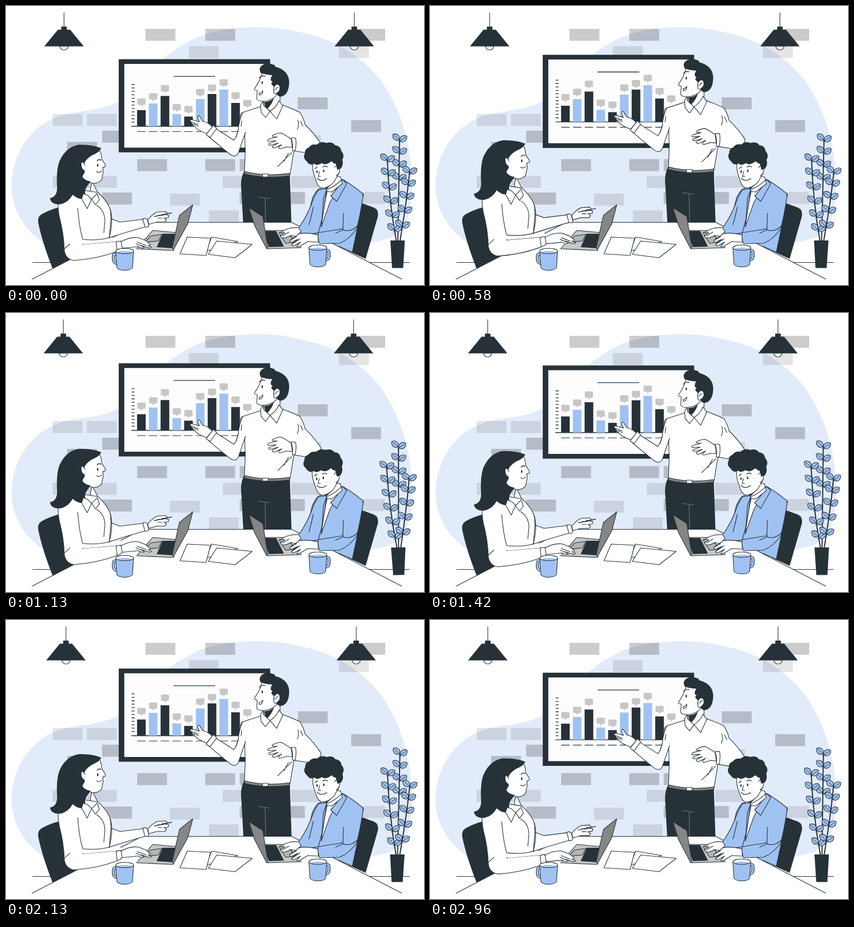
Write an HTML page that moves like this. It is 752x501 px and loops after 3 s.

```html
<!DOCTYPE html>
<html lang="en">
<head>
<meta charset="utf-8">
<title>Team meeting</title>
<style>
html, body { margin: 0; width: 100%; height: 100%; overflow: hidden; background: #fff; }
svg { display: block; width: 752px; height: 501px; }
</style>
</head>
<body>
<svg id="stage" viewBox="0 0 752 501" stroke-linecap="round" stroke-linejoin="round"></svg>
<script>
const DARK = '#263238', BLUE = '#a0c2f3', GRAY = '#c7c7c7', MID = '#868686', WHITE = '#fff';

const shape = (d, fill = WHITE) => `<path d="${d}" fill="${fill}" stroke="${DARK}" stroke-width="1.1"/>`;
const solid = (d, fill = DARK) => `<path d="${d}" fill="${fill}"/>`;
const line = (d, color = DARK, width = 1.1) => `<path d="${d}" fill="none" stroke="${color}" stroke-width="${width}"/>`;
const rect = (x, y, w, h, fill, extra = '') => `<rect x="${x}" y="${y}" width="${w}" height="${h}" fill="${fill}" ${extra}/>`;
const oval = (x, y, rx, ry, fill = DARK, extra = '') => `<ellipse cx="${x}" cy="${y}" rx="${rx}" ry="${ry}" fill="${fill}" ${extra}/>`;
const group = (name, ...parts) => `<g class="${name}">${parts.join('')}</g>`;

function wall() {
  const dark = [[251, 41], [358.5, 41], [628.5, 41], [525, 164], [621, 205], [236, 275], [358.5, 275],
    [420.5, 275], [173, 224], [110, 244], [173, 335], [420.5, 334], [484, 334]];
  const light = [[329, 72], [599, 72], [84, 194], [145.5, 194], [84, 305], [145.5, 305], [295, 337],
    [365, 367], [390, 305], [513, 305], [513, 232], [628, 334]];
  const bricks = (list, alpha) => list.map(([x, y]) => rect(x, y, 53.7, 21.5, '#000', `opacity="${alpha}"`)).join('');
  return solid('M10 322C10 270 42 210 108 194C160 184 196 186 226 152C262 110 296 78 345 56C390 37 470 32 525 46.5C588 57 638 89 672 131C711 184 729 250 730 310C731 370 722 404 690 417C640 432 560 440 400 440C250 440 150 450 98 440C52 424 10 380 10 322Z', '#e2ebf9')
    + bricks(dark, .2) + bricks(light, .1) + line('M48 460.5H104M655 460.5H726');
}

function lamp(x) {
  return `<g transform="translate(${x} 0)">` + shape('M-7.5 72A7.5 7 0 0 0 7.5 72Z') + line('M0 12V38')
    + solid('M-5 37H5V42.5H11L35.5 72.5H-35.5L-11 42.5H-5Z') + '</g>';
}

function board() {
  const tops = [187, 175, 161.5, 194, 198.5, 167, 158, 150, 174];
  const bubbles = [166, 156.5, 142, 176, 179.5, 149, 141, 131.5, 155, 168.5];
  const barX = i => 235.8 + i * 21.17;
  let out = rect(202.8, 95.5, 272.4, 167.3, DARK) + rect(212.8, 104, 253, 150.3, '#fdfdfe')
    + line('M302 126.4H376', DARK, 1.3) + line('M226 216H424', DARK, 1.4);
  for (let i = 0; i < 12; i++) out += line(`M226.5 ${141 + i * 6.15}h4.5`, DARK, 1.3);
  tops.forEach((y, i) => {
    out += rect(barX(i), y, 15.6, 216 - y, i % 2 ? BLUE : DARK) + line(`M${barX(i) + .5} 225.5h14.5`);
  });
  bubbles.forEach((y, i) => {
    const x = barX(i) + .4;
    out += rect(x, y, 14.8, 11.4, GRAY, 'rx="2"') + solid(`M${x + 5} ${y + 11}h5l-2.5 3.6z`, GRAY);
  });
  return out;
}

function presenter() {
  return solid('M428 298Q421 311 423.5 332L427.5 405H514L510.5 301Z')
    + line('M454 343L474 346M466 346Q467 365 467 402', '#7d868b', .9)
    // torso and far arm
    + shape('M492 176Q515 184 529 191Q536 203 538 213Q555 229 567 248L560 267L518 260L511 302Q470 309 429 298L430.5 258Q429 238 430 222L422 200Q421 193 426 191L460 180Z')
    + line('M525 205Q528 214 524 222M530 207L534 216M514 263L489 288M508 264L500 279')
    + shape('M513 237L521 237Q523 249 520 260L515 260Q517 248 513 237Z')
    // hand on chest
    + shape('M513 239Q502 231 495 228Q487 228 479 233L480 235L488 235L473 239Q469 241 472 243L486 242L473 247Q472 250 476 250L490 246L479 252Q479 255 483 255L496 249L490 254Q490 257 495 256L505 253L515 254Z')
    // pointing arm
    + shape('M426 191Q419 206 418 222Q415 235 410 241L377 220L364 234Q385 252 404 267Q413 273 418 264L431 226')
    + line('M424 206L423 216M418 222L414 235')
    + shape('M373 214L379 220L367 236L360 231Z')
    + shape('M371 217Q364 209 354 207L348 198Q345 195 345 201L348 208L334 204Q329 205 333 209L340 217Q346 224 361 229Z')
    + line('M333 208L346 213M338 212L346 216')
    // belt
    + shape('M429 297Q468 307 510.5 300.5V305Q468 311 429 301.5Z', MID) + rect(462, 301.5, 9.5, 5.5, WHITE, `stroke="${DARK}"`)
    // neck and collar
    + shape('M464 168V181L475 190L493 178V155Z') + solid('M465 172Q477 171 482 165Q479 176 470 185L466 180Z')
    + shape('M462 171L458 178L459 191L467 200L475 189L464 179Z')
    + shape('M491 170L498 179L487 203L475 189Q487 181 491 170Z')
    // head
    + shape('M461 119Q457 135 447 148.5Q446 151 452 152L451 166Q452 171 463 171Q478 170 487 160L492 135L480 118Z')
    + solid('M458 120Q454 112 460 107Q470 100 483 106Q484 110 488 110Q509 117 509.5 137Q509 158 497 162Q490 165 486 156L481 152L482 145L478 141Q476 138 480 136Q473 134 479 124Q468 124 458 120Z')
    + shape('M482 146Q487 137 492 143Q496 152 485 158Q481 158 482 152Z') + line('M485 151Q486 146 490 146')
    + oval(461, 137.5, 1.3, 2.6) + line('M456 129Q460 124 466 126', DARK, 1.4)
    + shape('M455 156.5Q459 157 462 152Q462 160 456 160Z');
}

function leftChair() {
  return solid('M97 361Q78 366 64 374Q56 379 58 389Q65 424 84 472L125 450Z');
}

function woman() {
  return shape('M152 328L154 345L166 337L155 315Z')
    // torso and lower arm
    + shape('M134 330Q108 338 97 345Q91 352 96 379Q104 408 105 440Q108 455 122 457Q165 454 199 441L207 437V422L138 428L186 417L189 383L188 368Q186 355 166 335Z')
    + solid('M137 420L186 417L206 413V422L140 428Z', WHITE)
    + line('M129 363Q132 399 138 419Q164 422 186 416M163 358Q177 366 178 385L176 407M105 436L115 427')
    // upper arm with the pen
    + shape('M189 382L205 388L246 383L252 396L211 408L186 416Z') + line('M188 366Q192 383 189 401L186 416')
    + shape('M246 382Q251 380 254 383L257 394Q256 398 250 397Z')
    + shape('M255 384Q264 373 272 370L287 369L291 373L281 374L293 376L292 380L284 381L289 384L286 388L271 388L257 392Z')
    + line('M267 378L298 371.5', DARK, 1.4) + line('M273 376L283 376M281 381L273 381')
    // typing hand
    + shape('M207 423Q224 414 238 416L251 421L260 428Q259 431 255 430L262 433Q260 436 253 433L243 430L249 434Q246 436 238 432Q221 434 207 435Z')
    + line('M236 424L252 430M234 427L244 431') + shape('M198 424Q203 421 207 423L209 435Q204 440 200 440Z')
    // head
    + shape('M167 257Q172 264 172 274L179 286Q180 289 174 290L175 297L172 312Q165 320 155 318L137 313L137 280Z')
    + solid('M172 256Q159 249 132 249Q108 252 96 279Q90 295 92 326Q92 343 79 345Q81 357 98 356Q112 353 120 339Q132 350 146 345Q139 335 145 325L152 315Q141 313 137 306Q144 296 140 287Q141 276 155 268Q169 262 170 257Z')
    + shape('M142 286Q137 276 135 283Q135 293 141 296') + solid('M139 293L136 308L142 298Z')
    + oval(165, 286, 1.3, 2.8) + line('M164 278Q167 274 171 277', DARK, 1.4) + line('M163 297Q167 301 172 296')
    // collar
    + shape('M139 337L136 346L146 364L154 347L147 340Z') + shape('M154 347L161 357L168 348L164 337Z');
}

function rightChair() {
  return solid('M640 354L662 362Q671 366 669 378L647 454L616 440Z');
}

function seatedBody() {
  return shape('M562 329Q553 338 550 350Q545 378 528 400L540 420L600 432L623 442L633 395L643 338Q628 325 607 312Z', BLUE)
    + shape('M580 325Q574 345 567 397L583 352L605 316L601 309Z');
}

function seatedArms() {
  return shape('M554 344Q542 378 526 399L524 407L535 412L562 407L570 377L577 328L562 330Z', BLUE)
    + line('M553 361L548 382L545 393')
    + shape('M498 404Q510 397 526 398L531 405L522 414L512 412Q502 418 496 416L493 413L502 407L494 407Z')
    + shape('M562 407L606 400L608 380L643 338Q638 372 631 400Q618 419 600 426L564 427Q560 415 562 407Z', BLUE)
    + solid('M606 399L608 350L638 336L641 341L630 396Z', BLUE)
    + line('M607 372L606 402L593 408M632 395Q620 407 606 402')
    + shape('M561 411Q541 406 527 409L511 421Q509 425 514 424L525 419L514 428Q513 432 519 430L530 424L523 432Q525 434 531 430L543 423L562 424Z')
    + line('M511 421L523 414M514 428L529 418M497 413L509 406')
    // lapels
    + line('M578 327L571 346L568 390')
    + shape('M605 311L613 319L595 351L584 341Q598 327 605 311Z', BLUE);
}

function seatedHead() {
  return shape('M574 326L578 333L586 334L605 319L602 307L589 305Z') + line('M577 330Q592 324 604 312')
    + solid('M573 326Q585 323 592 313L577 329Z')
    + shape('M552 281Q550 295 557 311Q560 324 568 327Q580 327 590 316L599 300L597 278Z')
    + shape('M591 290Q596 283 599 289Q603 299 594 305')
    + solid('M541 279Q533 272 538 264Q537 257 545 254Q550 247 559 249Q567 242 576 246Q587 243 592 250Q602 251 603 260Q610 268 605 276Q608 285 602 292L596 294L593 283Q588 283 586 278Q575 288 568 282Q558 288 555 283Q547 288 541 279Z')
    + oval(559.5, 297.5, 1.3, 2.5) + oval(571.5, 296, 1.3, 2.5)
    + line('M556 292L560 289M570 289Q574 286 578 289', DARK, 1.4) + line('M564 297L562 306L566 306')
    + line('M560 309Q566 317 577 310', DARK, 1.3);
}

function table() {
  return solid('M47 490.5L245 388.5H514L712 490.5Z', WHITE) + line('M47 490.5L245 388.5H514L712 490.5');
}

function tableware() {
  return shape('M370 415L417 423L386 434L360 440Z') + shape('M326 415L368 417L360 448L313 445Z') + shape('M379 422L443 428L412 452L364 446Z')
    + shape('M235 436L264 403L308 407L301 439Z', GRAY) + shape('M250 424L260 413L281 410L274 422Z', '#b4b4b4')
    + solid('M271 433L282 409H307L299 435Z') + shape('M336 357L327 391L301 438L299 434L312 376Z', MID)
    + shape('M463 403H504L531 434L471 436Z', GRAY) + shape('M491 407L505 404L521 424L503 426Z', '#b4b4b4')
    + solid('M463 404H486L500 432L473 433Z') + shape('M437 362L462 378L471 434L469 436L447 394Z', MID);
}

function mug(x, y, side) {
  const handle = 'M14 6Q21 3 20 12Q21 22 13 22';
  return `<g transform="translate(${x} ${y}) scale(${side} 1)">`
    + line(handle, DARK, 5.6) + line(handle, BLUE, 3.4)
    + shape('M-16 0Q-15 17 -14 30Q-10 34.5 0 34.5Q11 34.5 14 30Q15 17 16 0Z', BLUE)
    + oval(0, 0, 16, 4.8, WHITE, `stroke="${DARK}" stroke-width="1.1"`)
    + solid('M-13 1.5Q0 -2 13 1.5Q8 4 0 4Q-8 4 -13 1.5Z', BLUE) + '</g>';
}

function plant() {
  // each stem: tip, bend, foot and number of leaf pairs
  const stems = [[708, 241, 707, 320, 705, 421, 4], [686, 277, 689, 350, 702, 421, 6], [726, 299, 721, 350, 709, 421, 5]];
  const spacing = 25;
  let twigs = '', leaves = '';
  for (const [x0, y0, x1, y1, x2, y2, pairs] of stems) {
    twigs += line(`M${x0} ${y0}Q${x1} ${y1} ${x2} ${y2}`, DARK, 2);
    for (let i = 0; i < pairs; i++) {
      const t = i * spacing / (y2 - y0), s = 1 - t;
      const x = s * s * x0 + 2 * s * t * x1 + t * t * x2, y = s * s * y0 + 2 * s * t * y1 + t * t * y2;
      for (const [angle, drop] of [[-138, 0], [-35, 2]]) {
        leaves += `<g transform="translate(${x} ${y + drop}) rotate(${angle})">`
          + shape('M1 0C4 -7 12 -7 16 0C12 7 4 7 1 0Z', BLUE) + line('M-2 0H13', DARK, .9) + '</g>';
      }
    }
  }
  return twigs + leaves + solid('M691.5 421H717.5L714.5 470.5H694.5Z');
}

const stage = document.getElementById('stage');
stage.innerHTML = wall() + group('shake', lamp(104.4), lamp(626.6)) + group('float', board()) + group('float', presenter())
  + rightChair() + seatedBody() + leftChair() + table() + tableware() + seatedArms() + group('head', seatedHead())
  + group('float', woman()) + mug(213.5, 440, -1) + mug(561, 434, 1) + group('plant', plant());

const LOOP = 3000, FRAMES = 72, PERIOD = 1500, FRAME_TIME = LOOP / 72.5;
const SHAKE = [0, -1, 2, -4, 4, -4, 4, -4, 2, -1, 0];

const lift = p => -10.2 * (1 - Math.abs(2 * p - 1));
const sway = p => p < .25 ? 4 * p : p < .75 ? 2 - 4 * p : 4 * p - 4;
function shake(p) {
  const k = p * 10, i = Math.floor(k);
  return SHAKE[i] + (SHAKE[i + 1] - SHAKE[i]) * (k - i);
}

function move(name, transform) {
  stage.querySelectorAll('.' + name).forEach(g => g.setAttribute('transform', transform));
}

function draw(ms) {
  // the motion advances at 24 steps per second
  const frame = Math.floor((ms + 4) / LOOP * FRAMES) % FRAMES;
  const p = frame * FRAME_TIME % PERIOD / PERIOD;
  move('float', `translate(0 ${lift(p)})`);
  move('shake', `translate(${shake(p)} 0)`);
  move('plant', `rotate(${sway(p)} 705 349)`);
  move('head', `rotate(${sway(p)} 580 332)`);
}

const start = performance.now();
function tick() {
  draw(performance.now() - start);
  requestAnimationFrame(tick);
}
tick();
</script>
</body>
</html>
```
